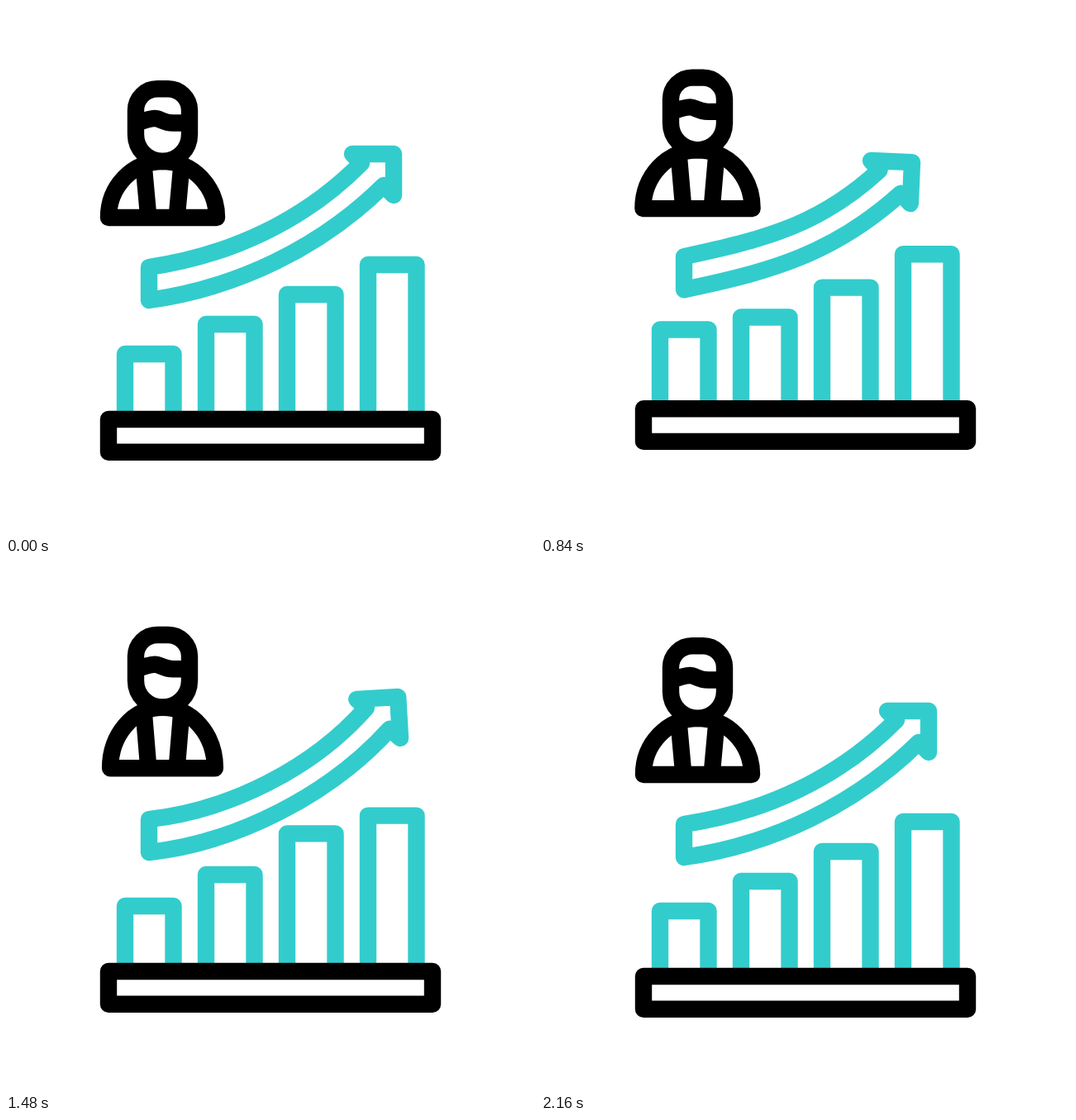
An HTML page for the animation above (2.32 s loop, 640 by 640 pixels).

```html
<!DOCTYPE html>
<html lang="en">
<head>
<meta charset="utf-8">
<title>Growth chart</title>
<style>
html, body { margin: 0; height: 100%; overflow: hidden; background: #fff; }
svg { display: block; width: 100vw; height: 100vh; }
path { fill: none; stroke: #000; stroke-width: 20.4; stroke-linejoin: round; }
.teal { stroke: #33cccc; }
</style>
</head>
<body>
<svg viewBox="0 0 640 640">
  <g id="all">
    <path id="bars" class="teal"/>
    <path id="arrow" class="teal"/>
    <path d="M124 500H516V539.7H124Z"/>
    <g id="person">
      <path id="body"/>
      <path d="M157 126A26 26 0 0 1 183 100.3H196A26 26 0 0 1 222 126V155.5A32.5 32.5 0 0 1 157 155.5ZM157 142C168 138 175 136 180 136C187 136 190 141.5 202 141.5H222"/>
    </g>
  </g>
</svg>
<script>
const LOOP = 2320, STEP = 40;
const $ = id => document.getElementById(id);

// Eased value through [time, value] keys
function track(t, keys) {
  if (t <= keys[0][0]) return keys[0][1];
  for (let i = 1; i < keys.length; i++) {
    const [t0, a] = keys[i - 1], [t1, b] = keys[i];
    if (t < t1) {
      const u = (t - t0) / (t1 - t0);
      return a + (b - a) * u * u * (3 - 2 * u);
    }
  }
  return keys[keys.length - 1][1];
}

const LIFT = [[560, 0], [1080, -23], [1680, 0]];
const HOP = [[60, 0], [620, 13.5], [1140, -23.7], [1680, 0]];
const WIDEN = [[240, 0], [620, 4.2], [1200, -7], [1640, 0]];
const STRETCH = [[240, 0], [640, -3.7], [1200, 18.5], [1640, 0]];
const BAR = [[120, 0], [430, 10.3], [825, -16.8], [1290, 0]];
const tipTrack = (low, high) => [[440, 0], [840, low], [1320, high], [1720, 0]];
const TIP_X = tipTrack(-20, 8), TIP_Y = tipTrack(23, -17), TIP_TURN = tipTrack(2.5, -5);

function barsPath(t) {
  let d = "";
  for (let i = 0; i < 4; i++) {
    const x = 144 + 98 * i, y = 421 - 36 * i + track(t - 290 * i, BAR);
    d += `M${x} 500V${y}h58.5V500`;
  }
  return d;
}

function arrowPath(t) {
  const dx = track(t, TIP_X), dy = track(t, TIP_Y), bend = -0.3 * dy;
  const a = track(t, TIP_TURN) * Math.PI / 180, c = Math.cos(a), s = Math.sin(a);
  // Point carried along with the arrow head
  const p = (x, y) => {
    const u = x - 469, v = y - 179;
    return `${469 + dx + u * c - v * s} ${179 + dy + u * s + v * c} `;
  };
  return `M173 316C270 ${302 + bend} ${p(361, 260)}${p(430, 190)}L${p(419, 179)}${p(469, 179)}` +
    `${p(469, 229)}${p(457, 217)}C${p(380, 293)}279 ${341 + bend} 173 356Z`;
}

function bodyPath(t) {
  const w = 65.5 + track(t, WIDEN), h = track(t, STRETCH);
  return `M${189.5 - w} ${256 + h}A${w} ${68 + h} 0 0 1 ${189.5 + w} ${256 + h}Z` +
    `M167 197L172 ${252 + h}M212 197L207 ${252 + h}`;
}

function draw(now) {
  const t = Math.floor(now % LOOP / STEP) * STEP;
  $("all").setAttribute("transform", `translate(0 ${track(t, LIFT)})`);
  $("person").setAttribute("transform", `translate(0 ${track(t, HOP)})`);
  $("bars").setAttribute("d", barsPath(t));
  $("arrow").setAttribute("d", arrowPath(t));
  $("body").setAttribute("d", bodyPath(t));
}

let start;
function tick(now) {
  start ??= now;
  draw(now - start);
  requestAnimationFrame(tick);
}
draw(0);
requestAnimationFrame(tick);
</script>
</body>
</html>
```
